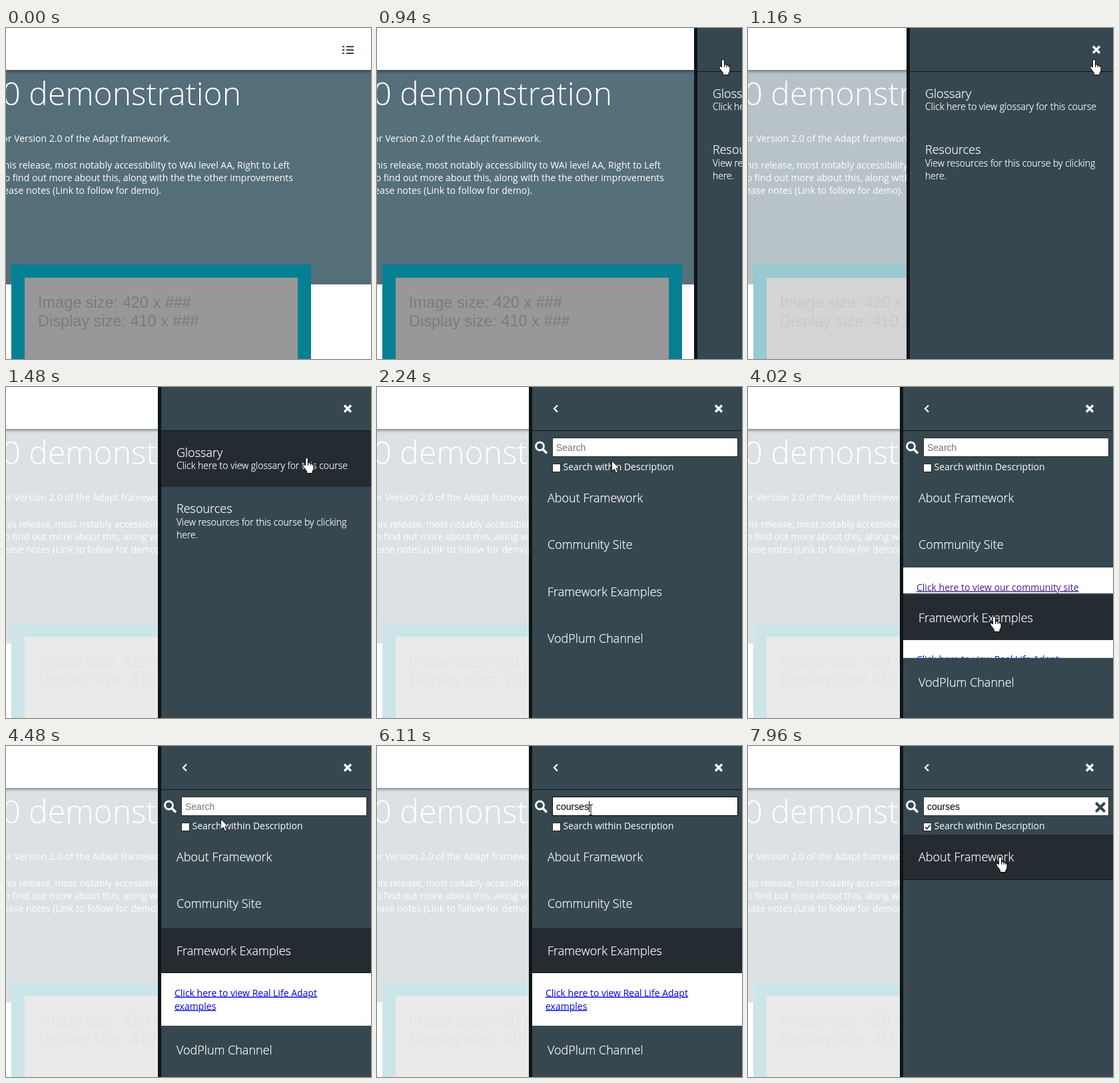
An HTML page that plays this animation: 548x497 px, repeating every 8000 ms.

```html
<!DOCTYPE html>
<html lang="en">
<head>
<meta charset="utf-8">
<title>Drawer search</title>
<style>
  html, body { margin: 0; width: 100%; height: 100%; overflow: hidden; background: #fff; }
  svg { display: block; }
  text { font: 14px "Open Sans", sans-serif; fill: #fff; white-space: pre; }
  .heading { font-size: 48px; font-weight: 300; }
  .title { font-size: 18px; font-weight: 300; }
  .light { font-weight: 300; }
  .title, .light { stroke: #fff; stroke-width: .25; }
  .end text { text-anchor: end; }
  .label { font: 23.5px "Liberation Sans", Arial, sans-serif; fill: #7b7b7b; }
  .field { font: 14px "Liberation Sans", Arial, sans-serif; fill: #000; }
  .link text { fill: #00e; text-decoration: underline; }
  .link.visited text { fill: #42208a; }
  .row { fill: #242c32; }
  .line { fill: none; stroke: #fff; }
  #cursor path { fill: #fff; stroke: #000; stroke-linejoin: round; }
</style>
</head>
<body>
<svg width="548" height="497" viewBox="0 0 548 497">
  <defs>
    <linearGradient id="shade" x2="0" y2="1">
      <stop offset="0" stop-opacity=".38"/>
      <stop offset=".5" stop-opacity=".14"/>
      <stop offset="1" stop-opacity="0"/>
    </linearGradient>
  </defs>
  <rect width="548" height="497" fill="#fff"/>

  <g id="page">
    <rect y="63" width="548" height="322" fill="#546e7a"/>
    <g class="end">
      <text class="heading" x="353" y="116">0 demonstration</text>
      <text x="247" y="171">or Version 2.0 of the Adapt framework.</text>
      <text x="426" y="211">his release, most notably accessibility to WAI level AA, Right to Left</text>
      <text x="431" y="230">to find out more about this, along with the the other improvements</text>
      <text x="233" y="249">lease notes (Link to follow for demo).</text>
    </g>
    <rect x="8" y="355" width="450" height="142" fill="#058092"/>
    <rect x="28" y="375" width="410" height="122" fill="#989898"/>
    <text class="label" x="48" y="420">Image size: 420 x ###</text>
    <text class="label" x="48" y="448">Display size: 410 x ###</text>
  </g>

  <rect y="63" width="548" height="6" fill="url(#shade)"/>
  <rect width="548" height="63" fill="#fff"/>
  <path d="M505 28h3M505 33h3M505 38h3M511 28h11M511 33h11M511 38h11"
        stroke="#37474f" stroke-width="2.1"/>

  <g id="drawer">
    <rect x="228" width="320" height="497" fill="#37474f"/>
    <g id="menu">
      <rect class="row" id="glossary" x="233" y="66" width="315" height="84"/>
      <rect class="row" id="resources" x="233" y="150" width="315" height="105"/>
      <text class="title" x="256" y="105">Glossary</text>
      <text class="light" x="256" y="123">Click here to view glossary for this course</text>
      <text class="title" x="256" y="189">Resources</text>
      <text class="light" x="256" y="208">View resources for this course by clicking</text>
      <text class="light" x="256" y="227">here.</text>
    </g>
    <g id="list">
      <path class="line" d="M271 27.5l-5 5 5 5" stroke-width="2.2"/>
      <circle class="line" cx="244.5" cy="89" r="6" stroke-width="2.8"/>
      <path class="line" d="M249 93.5l6 6" stroke-width="3.6"/>
      <rect id="box" x="263.5" y="76.5" width="278" height="28" fill="#fff"/>
      <text class="field" id="query" x="269" y="96"></text>
      <rect id="caret" y="83" width="1" height="16"/>
      <path id="clear" d="M523.5 86.5l11 11m0-11l-11 11" stroke="#37474f" stroke-width="4.2" stroke-linecap="round"/>
      <rect x="263.5" y="115.5" width="12" height="12" fill="#fff" stroke="#222"/>
      <path id="check" d="M266 121.5l2.5 3 5-6" fill="none" stroke="#222" stroke-width="1.5"/>
      <text x="279.5" y="125">Search within Description</text>
      <g id="items"></g>
    </g>
    <rect x="228" width="5" height="497" fill="#0e1517"/>
    <rect x="233" y="65" width="315" height="1" fill="#0e1517"/>
    <path class="line" d="M508 27.5l10 10m0-10l-10 10" stroke-width="3.4"/>
  </g>

  <g id="cursor">
    <path id="arrow" d="M.5.5v16l3.7-3.4 2.6 6 2.7-1.2-2.6-5.8h5z"/>
    <path id="hand" d="M-3.5 1.5q0-2 2-2t2 2v5.500q3-1 3.500 1 2.500-1 3 1 2-.5 2 1.500v4.500q0 2.500-2 4.500v3h-8.500v-3l-4.500-6q-2-3-1-4t3 1l.5.500zM.5 7v4M4 8v3M7 9v2"/>
    <path id="beam" d="M-3-8h2l1 1 1-1h2M0-7v14M-3 8h2l1-1 1 1h2" style="fill:none"/>
  </g>
</svg>

<script>
const LOOP = 8000, TICK = 77.3;
const $ = id => document.getElementById(id);
const show = (node, on) => node.style.display = on ? '' : 'none';
const clamp = v => Math.min(1, Math.max(0, v));
const progress = (t, start, length) => clamp((t - start) / length);
const swing = p => .5 - Math.cos(p * Math.PI) / 2;

// Pointer path: tick, x, y
const path = [
  [1, 537, 335], [3, 515, 235], [5, 498, 145], [7, 494, 85], [10, 521, 48], [17, 521, 48],
  [22, 352, 195], [27, 352, 195], [28, 350, 150], [29, 352, 110], [31, 345, 90],
  [33, 355, 160], [36, 365, 237], [40, 365, 240], [43, 366, 326], [44, 369, 343],
  [46, 369, 343], [47, 371, 345], [54, 371, 345], [58, 322, 109], [60, 321, 94],
  [64, 321, 94], [65, 321, 96], [85, 321, 96], [88, 331, 109], [89, 331, 109],
  [93, 269, 121], [97, 269, 121], [98, 320, 141], [99, 366, 152], [102, 366, 152], [103, 380, 167]
];
const keyTicks = [68, 71, 72, 73, 75, 78, 79];
const items = [
  { name: 'About Framework', top: 133, base: 40 },
  { name: 'Community Site', top: 203, base: 40, size: 59, kind: 'visited',
    lines: ['Click here to view our community site'] },
  { name: 'Framework Examples', top: 273, base: 41, size: 79,
    lines: ['Click here to view Real Life Adapt', 'examples'] },
  { name: 'VodPlum Channel', top: 344, base: 40 }
];

for (const item of items) {
  const lines = (item.lines || []).map((s, i) => `<text x="20" y="${34.5 + 20 * i}">${s}</text>`).join('');
  $('items').insertAdjacentHTML('beforeend', `<g>
    <g><rect class="row" x="233" width="315" height="67"/>
    <rect x="233" y="67" width="315" height="1" fill="#0e1517"/></g>
    <text class="title" x="256" y="${item.base}">${item.name}</text>
    <svg class="link ${item.kind || ''}" x="233" y="68" width="315" height="0">
    <rect width="315" height="100" fill="#fff"/>${lines}</svg></g>`);
  item.node = $('items').lastElementChild;
  item.row = item.node.firstElementChild;
  item.panel = item.node.querySelector('svg');
}

function pointer(tick) {
  const next = path.findIndex(p => p[0] >= tick);
  if (next < 1) return path[next < 0 ? path.length - 1 : 0].slice(1);
  const [a, x0, y0] = path[next - 1], [b, x1, y1] = path[next];
  const p = (tick - a) / (b - a);
  return [x0 + (x1 - x0) * p, y0 + (y1 - y0) * p];
}

function drawList(tick, t, y) {
  const switched = swing(progress(t, 3900, 300));
  const open = [0, swing(progress(t, 2890, 300)) - switched, switched, 0];
  const active = tick >= 51 ? 2 : tick >= 38 ? 1 : -1;
  let shift = 0, hovered = false;
  items.forEach((item, i) => {
    const top = item.top + shift;
    const size = open[i] * (item.size || 0);
    const visible = tick < 84 || (i === 0 && tick >= 98);
    const over = visible && y >= top && y < top + 68;
    show(item.node, visible);
    show(item.row, over || i === active);
    show(item.panel, size > 0);
    item.node.setAttribute('transform', `translate(0 ${top})`);
    item.panel.setAttribute('height', size);
    shift += size;
    hovered = hovered || over;
  });

  const typed = keyTicks.filter(k => k <= tick).length;
  const query = $('query');
  query.textContent = typed ? 'courses'.slice(0, typed) : 'Search';
  query.style.fill = typed ? '#000' : '#757575';
  $('caret').setAttribute('x', 269 + (typed ? Math.round(query.getComputedTextLength()) : 0));
  show($('caret'), tick >= 62 && tick < 95);
  $('box').setAttribute('stroke', tick >= 62 && tick < 87 ? '#000' : '#2b2b2b');
  show($('clear'), tick >= 84);
  show($('check'), tick >= 95);
  return hovered;
}

function render(time) {
  const tick = Math.floor(time / TICK + .2), t = tick * TICK;
  const [x, y] = pointer(tick);
  const listed = tick >= 25;

  $('page').style.opacity = 1 - .8 * swing(progress(t, 900, 394));
  const away = Math.round(320 * (1 - progress(t, 900, 448)) ** 4);
  $('drawer').setAttribute('transform', `translate(${away} 0)`);
  show($('drawer'), tick >= 12);
  show($('menu'), !listed);
  show($('list'), listed);

  const inMenu = tick >= 17 && !listed;
  const onGlossary = inMenu && y >= 66 && y < 150;
  const onResources = inMenu && y >= 150;
  show($('glossary'), onGlossary);
  show($('resources'), onResources);
  const onItem = listed && drawList(tick, t, y);

  const onField = listed && y > 76 && y < 105;
  const onHand = onItem || onGlossary || onResources || (x > 490 && y < 64);
  show($('cursor'), tick >= 1);
  show($('beam'), onField);
  show($('hand'), onHand);
  show($('arrow'), !onField && !onHand);
  $('cursor').setAttribute('transform', `translate(${Math.round(x)} ${Math.round(y)})`);
}

const begin = performance.now();
function loop() {
  render((performance.now() - begin) % LOOP);
  requestAnimationFrame(loop);
}
loop();
</script>
</body>
</html>
```
